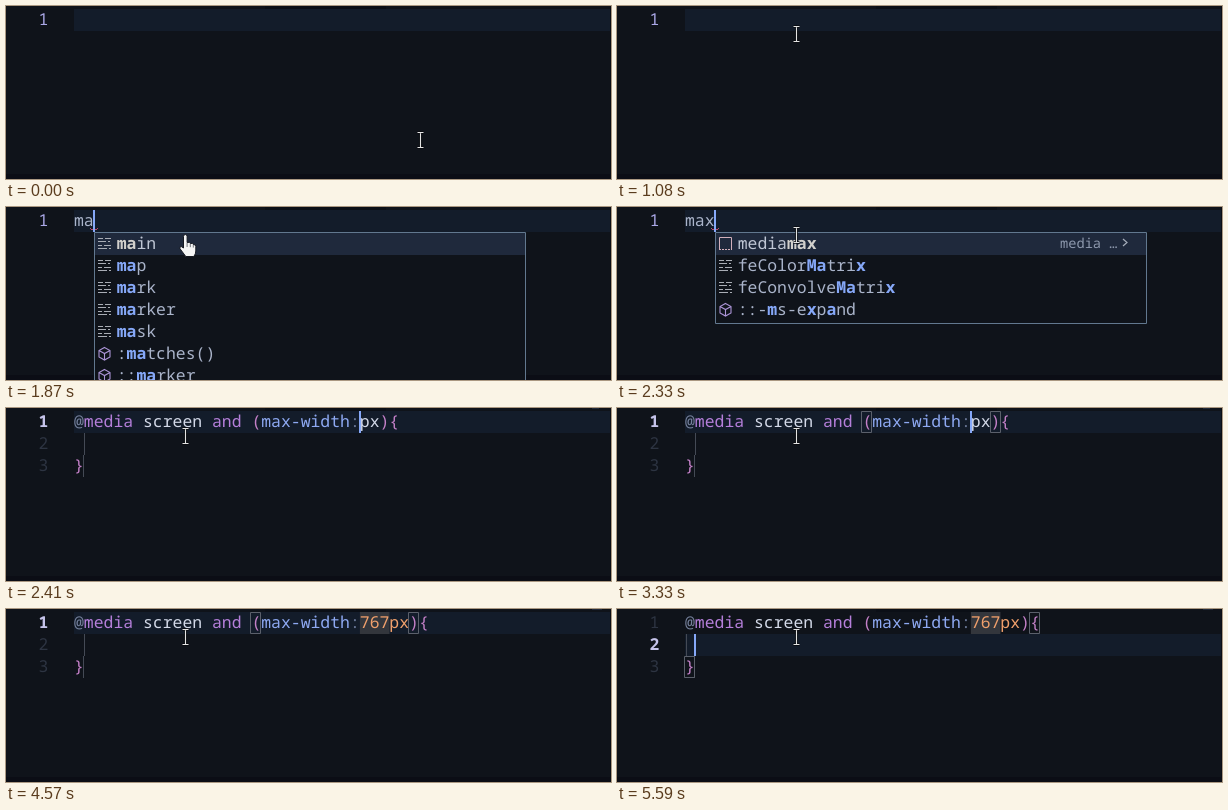
Recreate the animation shown at these times as an HTML page. Size 605x173 px, loop 5680 ms.

```html
<!DOCTYPE html>
<html lang="en">
<head>
<meta charset="utf-8">
<title>Editor autocompletion</title>
<style>
  html, body { margin: 0; width: 100%; height: 100%; overflow: hidden; background: #0f131a; }
  svg { display: block; }
  text {
    font-family: "Noto Sans Mono", "DejaVu Sans Mono", monospace;
    font-size: 16.43px;
    white-space: pre;
    text-rendering: geometricPrecision;
    fill: #aab4ca;
  }
  .bold { font-weight: 700; }
  .match { font-weight: 700; fill: #86a8f8; }
  .picked { fill: #bfc6d4; }
  .picked .match { fill: #d2d0cc; }
  .detail { font-size: 13.7px; fill: #8d98ad; }
  .at { fill: #75809b; }
  .keyword { fill: #b57fda; }
  .plain { fill: #d3d9e8; }
  .prop { fill: #8ea9f2; }
  .colon { fill: #6a7796; }
  .paren { fill: #c480c8; }
  .number { fill: #f0a06c; }
  .lineno { fill: #2d3442; }
  .active { fill: #aaa7e6; }
  .bright { fill: #c5c3ea; font-weight: 600; }
</style>
</head>
<body>
<svg id="stage" width="605" height="173" viewBox="0 0 605 173"></svg>
<script>
const LOOP = 5680, CHAR = 9.858, LEFT = 68, ROW = 22, TOP = 3;
const stage = document.getElementById('stage');
const parts = [];

const col = n => LEFT + n * CHAR;
const rowTop = n => TOP + n * ROW;
const rect = (x, y, w, h, fill) =>
  `<rect x="${x}" y="${y}" width="${w}" height="${h}" fill="${fill}"/>`;
const path = (d, stroke, width = 1, fill = 'none') =>
  `<path d="${d}" fill="${fill}" stroke="${stroke}" stroke-width="${width}"/>`;
const text = (x, y, body, cls = '') => `<text x="${x}" y="${y}" class="${cls}">${body}</text>`;
const span = (cls, body) => `<tspan class="${cls}">${body}</tspan>`;

// Each part is shown during the given [start, end) spans.
function add(markup, ...spans) {
  const node = document.createElementNS('http://www.w3.org/2000/svg', 'g');
  node.innerHTML = markup;
  stage.append(node);
  if (spans.length) parts.push({ node, spans });
}

const lineNo = (n, cls) => text(32.5, rowTop(n - 1) + 16, n, 'lineno ' + cls);
const highlight = row => rect(LEFT, rowTop(row), 537, ROW, '#131c2a');
const bracketBox = (column, row) =>
  path(`M${Math.round(col(column)) - .5} ${rowTop(row) + .5}h10v21h-10z`, '#5b606b');
const guide = (x, row) => rect(x, rowTop(row), 1, ROW, '#444a55');

// Editor background
add(rect(0, 0, 605, 173, '#0f131a') + rect(0, 168, 605, 5, '#0b0d15'));
add(highlight(0), [0, 4670]);
add(highlight(1), [4670, LOOP]);
add(rect(259, 0, 121, 3, '#0b0f16') + rect(604, 0, 1, 173, '#0b0e15'));
add(lineNo(1, 'active'), [0, 2410]);
add(lineNo(1, 'bright') + lineNo(2, '') + lineNo(3, ''), [2410, 4670]);
add(lineNo(1, '') + lineNo(2, 'bright') + lineNo(3, ''), [4670, LOOP]);

// Typed word
[['m', 1710, 1790], ['ma', 1790, 1950], ['max', 1950, 2410]].forEach(([word, from, to]) =>
  add(text(LEFT, 19, word), [from, to]));
const squiggle = x => path(`M${x} 21l2 2 2-2 2 2 2-2`, '#c0496b');
add(squiggle(84), [1870, 1950]);
add(squiggle(94), [2020, 2410]);

// Media query
function mediaQuery(digits, from, to) {
  const number = digits ? rect(col(29), 3, digits.length * CHAR, ROW, '#33363c') : '';
  add(number + text(LEFT, 19,
    span('at', '@') + span('keyword', 'media') + span('plain', ' screen ') +
    span('keyword', 'and ') + span('paren', '(') + span('prop', 'max-width') +
    span('colon', ':') + span('number', digits) + span(digits ? 'number' : 'plain', 'px') +
    span('paren', '){')) +
    text(LEFT, 63, '}', 'paren') + guide(77, 2) +
    rect(586, 0, 7 + digits.length, 1, '#20293a'), [from, to]);
}
const typed = [['', 2410, 3560], ['7', 3560, 3810], ['76', 3810, 4040], ['767', 4040, LOOP]];
typed.forEach(step => mediaQuery(...step));
typed.forEach(([digits, from, to]) =>
  add(bracketBox(18, 0) + bracketBox(31 + digits.length, 0),
    [Math.max(from, 2480), Math.min(to, 4670)]));
add(guide(78, 1), [2410, 4670]);
add(guide(69, 1) + bracketBox(35, 0) + bracketBox(0, 2), [4670, LOOP]);

// Suggestion lists
const icons = {
  word: (x, y) => path(`M${x} ${y + 1.5}h5m2 0h6M${x} ${y + 4.5}h8m2 0h2M${x} ${y + 8.5}h4m2 0h7M${x} ${y + 11.5}h9m2 0h2`, '#a9adb5'),
  cube: (x, y) => path(`M${x + 6.5} ${y + .5}l5.5 3v6.5l-5.5 3-5.5-3v-6.5zM${x + 1} ${y + 3.5}l5.5 3 5.5-3m-5.5 3v6.5`, '#ab94d6', 1.1),
  snippet: (x, y) => path(`M${x + .5} ${y + 12}v-11.5h12v11.5`, '#d3b0bb') +
    path(`M${x} ${y + 12.5}h2m1 0h2m1 0h2m1 0h2m1 0h1`, '#d3b0bb')
};
const mark = label => label.replace(/\*(.+?)\*/g, (_, hit) => span('match', hit));
function popup(x, height, items, extra, from, to) {
  const rows = items.map(([icon, label], i) => {
    const y = 25 + i * ROW;
    return icons[icon](x + 4, y + 5) + text(x + 22.7, y + 17, mark(label), i ? '' : 'picked');
  }).join('');
  add(rect(x, 25, 432, height, '#0f131a') + rect(x + 1, 26, 430, 22, '#1f293c') + rows + extra +
    path(`M${x + .5} 25.5h431v${height - 1}h-431z`, '#62788f'), [from, to]);
}
popup(88, 160, [
  ['word', '*ma*in'], ['word', '*ma*p'], ['word', '*ma*rk'], ['word', '*ma*rker'],
  ['word', '*ma*sk'], ['cube', ':*ma*tches()'], ['cube', '::*ma*rker']
], '', 1870, 2020);
popup(98, 92, [
  ['snippet', 'media*max*'], ['word', 'feColor*Ma*tri*x*'],
  ['word', 'feConvolve*Ma*tri*x*'], ['cube', '::-*m*s-e*x*p*a*nd']
], text(443, 41, 'media …', 'detail') + path('M506 32l4 3.5-4 3.5', '#a5adba', 1.2), 2020, 2410);

// Text caret: column, row, visible spans
[
  [0, 0, [530, 1080], [1630, 1710]],
  [1, 0, [1710, 1790]],
  [2, 0, [1790, 1950]],
  [3, 0, [1950, 2410]],
  [29, 0, [2410, 2870], [3330, 3560]],
  [30, 0, [3560, 3810]],
  [31, 0, [3810, 4040]],
  [32, 0, [4040, 4570]],
  [1, 1, [4670, 5040], [5590, LOOP]]
].forEach(([column, row, ...spans]) =>
  add(rect(Math.floor(col(column)), rowTop(row), 2, ROW, '#86a8f8'), ...spans));

// Mouse pointer
const beamShape = 'M-3 -7.5h2.5l.5 .5 .5-.5h2.5M0 -7v14M-3 7.5h2.5l.5-.5 .5 .5h2.5';
const beam = (x, y) => `<g transform="translate(${x + .5} ${y})">` +
  path(beamShape, '#080a0e', 2.4) + path(beamShape, '#e4e4e4', 1.1) + '</g>';
[
  [414, 134, 0, 70], [383, 106, 70, 150], [324, 69, 150, 230], [256, 36, 230, 300],
  [203, 17, 300, 380], [179, 12, 380, 530], [182, 22, 530, 600], [185, 31, 600, 680],
  [179, 28, 680, 1870], [179, 28, 2330, LOOP]
].forEach(([x, y, from, to]) => add(beam(x, y), [from, to]));
add(path('M177.5 41v-11.5q0-2 1.8-2t1.8 2v6q3-.8 3.2 1 2.8-.7 3 1 2.5-.2 2.5 2v4.5q0 3-2 5.5h-8l-5.8-7.8q-.7-2.4 1.2-2.2z',
  '#151820', 1, '#f5f5f5') + path('M181.1 36v4m3.2-3.2v3.4m3-2.2v2.6', '#50545c', .8), [1870, 2330]);

const start = performance.now();
function draw() {
  const t = (performance.now() - start) % LOOP;
  for (const { node, spans } of parts) {
    const on = spans.some(([from, to]) => t >= from && t < to);
    node.style.display = on ? '' : 'none';
  }
  requestAnimationFrame(draw);
}
draw();
</script>
</body>
</html>
```
